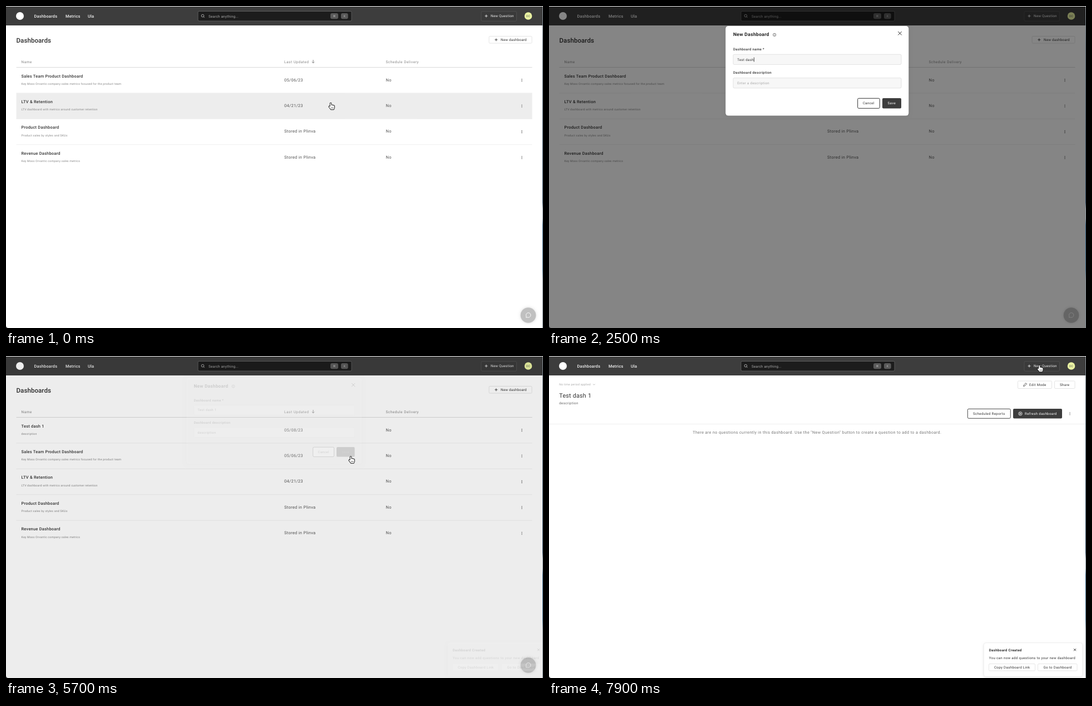
Animation, 965 px wide and 580 px high, one loop 8 s. Source, as an HTML page with a canvas:

```html
<!DOCTYPE html>
<html lang="en">
<head>
<meta charset="utf-8">
<title>Dashboards</title>
<style>
html, body { margin: 0; width: 100%; height: 100%; overflow: hidden; background: #fff; }
canvas { display: block; width: 965px; height: 580px; }
</style>
</head>
<body>
<canvas id="stage"></canvas>
<script>
const W = 965, H = 580, LOOP = 8000, TICK = 100;
const FONT = 'Roboto, "DejaVu Sans", sans-serif';
const canvas = document.getElementById('stage');
const ratio = window.devicePixelRatio || 1;
canvas.width = W * ratio;
canvas.height = H * ratio;
const ctx = canvas.getContext('2d');

// Text styles: weight, size, letter spacing, colour
const STYLE = {
  nav: [500, 7.4, 0.2, '#f4f4f4'],
  heading: [500, 11.5, 0.08, '#2c2c2c'],
  title: [400, 10.8, 0.2, '#333'],
  column: [400, 6.5, 0.5, '#858585'],
  name: [500, 7.4, 0.25, '#333'],
  note: [400, 5.2, 0.2, '#858585'],
  cell: [400, 7.5, 0.3, '#555'],
  action: [400, 6.3, 0.22, '#333'],
  body: [400, 6.2, 0.33, '#333'],
  label: [500, 6.2, 0.3, '#333'],
  strong: [700, 6.2, 0.33, '#2c2c2c'],
  modalTitle: [700, 8.6, 0.3, '#222'],
  empty: [400, 7.2, 0.38, '#777']
};

const DASHBOARDS = [
  ['Test dash 1', 'description', '05/08/23'],
  ['Sales Team Product Dashboard', 'Key Moss Orvantic company sales metrics focused for the product team', '05/06/23'],
  ['LTV & Retention', 'LTV dashboard with metrics around customer retention', '04/21/23'],
  ['Product Dashboard', 'Product sales by styles and SKUs', 'Stored in Plinva'],
  ['Revenue Dashboard', 'Key Moss Orvantic company sales metrics', 'Stored in Plinva']
];
const ROW_TOP = 110.5, ROW_H = 46.4;

// Pointer stops: time, x, y
const POINTER = [
  [0, 583.5, 174.5], [700, 906.5, 65], [1000, 906.5, 65], [1600, 496, 98],
  [4300, 497, 98], [4600, 626, 193], [4800, 619.5, 181], [5700, 619.5, 181],
  [5800, 619.5, 180], [6500, 915, 560], [6600, 915, 560], [7200, 830, 124],
  [7300, 830, 124], [7700, 881, 16.5], [LOOP, 881, 16.5]
];

const BUTTON = {
  create: [868, 54.5, 77, 12.5],
  save: [599, 166, 34, 18.5],
  goTo: [878.5, 554.5, 70.5, 12.5],
  refresh: [834, 95, 88, 17.5]
};

const CURSOR = {
  arrow: new Path2D('M0 0V9L2 7.1L3.5 10.3L5.1 9.6L3.7 6.5H6.5Z'),
  hand: new Path2D('M-.9 .8Q0 -.6 .9 .8V4.3Q2.2 3.2 2.9 4.6Q4.2 3.6 4.8 5Q6.5 4.3 6.5 6V8.4Q6.4 10 5.3 11.8H.3Q-.9 9.8 -3 7.5Q-3.4 5.8 -1.9 6L-.9 7Z')
};

const mix = (a, b, p) => a + (b - a) * p;
const smooth = p => p * p * (3 - 2 * p);
const inside = (p, [x, y, w, h]) => p.x >= x && p.x <= x + w && p.y >= y && p.y <= y + h;

function text(str, x, middle, style, color, align = 'left') {
  const [weight, size, spacing, ink] = STYLE[style];
  ctx.font = `${weight} ${size}px ${FONT}`;
  ctx.letterSpacing = spacing + 'px';
  ctx.textRendering = 'geometricPrecision';
  ctx.textAlign = align;
  ctx.fillStyle = color || ink;
  ctx.fillText(str, x, middle + size * 0.355);
  return ctx.measureText(str).width;
}

function box([x, y, w, h], radius, fill, stroke, width = 0.8) {
  ctx.beginPath();
  ctx.roundRect(x, y, w, h, radius);
  if (fill) { ctx.fillStyle = fill; ctx.fill(); }
  if (stroke) { ctx.strokeStyle = stroke; ctx.lineWidth = width; ctx.stroke(); }
}

function shadowBox(rect, radius, blur, stroke) {
  ctx.save();
  ctx.shadowColor = 'rgba(0,0,0,.1)';
  ctx.shadowBlur = blur * ratio;
  ctx.shadowOffsetY = ratio;
  box(rect, radius, '#fff');
  ctx.restore();
  if (stroke) box(rect, radius, null, stroke);
}

function lines(color, width, ...paths) {
  ctx.beginPath();
  for (const path of paths) {
    path.forEach(([x, y], i) => i ? ctx.lineTo(x, y) : ctx.moveTo(x, y));
  }
  ctx.strokeStyle = color;
  ctx.lineWidth = width;
  ctx.stroke();
}

function circle(x, y, r, fill, stroke, width = 0.8) {
  box([x - r, y - r, 2 * r, 2 * r], r, fill, stroke, width);
}

const plus = (x, y, color) =>
  lines(color, 0.9, [[x - 2.5, y], [x + 2.5, y]], [[x, y - 2.5], [x, y + 2.5]]);
const cross = (x, y, r, width) =>
  lines('#222', width, [[x - r, y - r], [x + r, y + r]], [[x + r, y - r], [x - r, y + r]]);
const kebab = (x, y) => [-2, 0, 2].forEach(d => circle(x, y + d, 0.65, '#444'));

function drawHeader() {
  ctx.fillStyle = '#3d3d3d';
  ctx.fillRect(0, 1, 964, 34);
  circle(25, 18, 7, '#fff');
  text('Dashboards', 50.5, 18, 'nav');
  text('Metrics', 107, 18, 'nav');
  text('Ula', 147, 18, 'nav');
  box([345, 9.5, 276, 17.5], 2, '#1c1c1c', '#666');
  circle(353.4, 17.6, 2.3, null, '#ccc');
  lines('#ccc', 0.8, [[355, 19.3], [356.7, 21]]);
  text('Search anything...', 364, 18.7, 'action', '#aaa');
  box([583, 13, 14, 10.3], 3, '#5a5a5a');
  box([602, 13, 12.7, 10.3], 3, '#5a5a5a');
  text('⌘', 590, 18.2, 'note', '#bbb', 'center');
  text('K', 608.5, 18.2, 'note', '#bbb', 'center');
  box([854, 9.8, 63.5, 17.4], 2, '#3a3a3a', '#555');
  plus(863, 18, '#eee');
  text('New Question', 871, 18.2, 'action', '#eee');
  circle(938.5, 18, 6.8, '#eaf3a2');
  text('DC', 938.6, 18.1, 'note', '#555', 'center');
}

function drawList(t, hoverRow) {
  text('Dashboards', 18.5, 62.3, 'heading');
  box(BUTTON.create, 1.5, '#fff', '#dedede');
  plus(880.8, 60.8, '#333');
  text('New dashboard', 889, 60.8, 'action');
  text('Name', 27.5, 100.2, 'column');
  text('Last Updated', 500, 100.2, 'column');
  lines('#666', 0.8, [[552, 97], [552, 102.7]], [[549.8, 100.5], [552, 102.8], [554.2, 100.5]]);
  text('Schedule Delivery', 682.5, 100.2, 'column');
  lines('#dadada', 1, [[18.5, ROW_TOP], [945.5, ROW_TOP]]);
  listRows(t).forEach(([name, note, updated], i, rows) => {
    const y = ROW_TOP + i * ROW_H;
    if (i === hoverRow) {
      ctx.fillStyle = '#ededed';
      ctx.fillRect(18.5, y, 927, ROW_H);
    }
    text(name, 27.5, y + 15.5, 'name');
    text(note, 27.5, y + 29.6, 'note');
    text(updated, 500, y + 22.5, 'cell');
    text('No', 682.5, y + 22.5, 'cell');
    kebab(927, y + 23.2);
    if (i < rows.length - 1) {
      lines('#ededed', 0.8, [[18.5, y + ROW_H], [945.5, y + ROW_H]]);
    }
  });
}

function drawDetail(pointer) {
  text('No time period applied', 18.3, 51, 'note', '#aaa');
  lines('#aaa', 0.8, [[79.3, 50.5], [81, 52.2], [82.7, 50.5]]);
  text('Test dash 1', 18.3, 70.8, 'title');
  text('description', 18.3, 85, 'body', '#666');
  box([842.5, 45, 61, 13.5], 1.5, '#fff', '#dedede');
  lines('#333', 0.8, [[852.7, 54.5], [853.2, 52.4], [857, 48.6], [858.6, 50.2], [854.8, 54], [852.7, 54.5]]);
  text('Edit Mode', 863, 51.8, 'body');
  box([908.5, 45, 36.5, 13.5], 1.5, '#fff', '#dedede');
  text('Share', 918, 51.8, 'body');
  box([752.3, 95.3, 77, 17], 2, '#fff', '#333', 0.9);
  text('Scheduled Reports', 762, 103.8, 'body');
  box(BUTTON.refresh, 2, inside(pointer, BUTTON.refresh) ? '#1e1e1e' : '#3d3d3d');
  circle(847, 103.8, 3.2, null, '#fff');
  lines('#fff', 0.8, [[846.1, 102.3], [848.6, 103.8], [846.1, 105.3], [846.1, 102.3]]);
  text('Refresh dashboard', 855, 103.8, 'body', '#fff');
  kebab(936, 103.8);
  lines('#ebebeb', 0.8, [[0, 122.5], [964, 122.5]]);
  text('There are no questions currently in this dashboard. Use the "New Question" button to create a question to add to a dashboard.',
    481.7, 137.3, 'empty', null, 'center');
}

function drawChat() {
  ctx.save();
  ctx.shadowColor = 'rgba(0,0,0,.15)';
  ctx.shadowBlur = 5 * ratio;
  circle(938.5, 557, 13.8, '#c0c0c0');
  ctx.restore();
  ctx.beginPath();
  ctx.arc(938.7, 556.8, 4.2, Math.PI * 0.85, Math.PI * 2.6);
  ctx.lineTo(934.6, 561);
  ctx.closePath();
  ctx.strokeStyle = '#fff';
  ctx.lineWidth = 0.9;
  ctx.stroke();
}

function drawToast(t) {
  if (t < 5700) return;
  const shift = t < 5800 ? 12 : t < 6100 ? 1 : 0;
  ctx.save();
  ctx.globalAlpha = t < 5800 ? 0.13 : 1;
  ctx.translate(shift, 0);
  shadowBox([781.3, 516.7, 177.4, 60.8], 4, 4, '#ededed');
  text('Dashboard Created', 790.7, 529.3, 'strong');
  cross(945, 529.2, 2, 0.9);
  text('You can now add questions to your new dashboard', 790.7, 544.2, 'body');
  box([790.5, 554.5, 83, 12.5], 1.5, '#fff', '#e0e0e0');
  text('Copy Dashboard Link', 800, 560.7, 'body');
  box(BUTTON.goTo, 1.5, '#fff', '#e0e0e0');
  text('Go to Dashboard', 888.5, 560.7, 'body');
  ctx.restore();
}

function drawField(y, value, placeholder, focused) {
  box([331, y, 302, 18.2], 2, '#f7f7f7', '#dcdcdc');
  const middle = y + 9.3;
  const width = value ? text(value, 338.2, middle, 'body') : 0;
  if (!value) text(placeholder, 338.2, middle, 'body', '#a8a8a8');
  if (focused) lines('#222', 0.8, [[338.6 + width, middle - 4], [338.6 + width, middle + 4]]);
}

function typedName(t) {
  if (t < 1800) return '';
  const count = t >= 2900 ? 11 : t >= 2800 ? 10 : 1 + Math.round(Math.min(1, (t - 1800) / 700) * 8);
  return 'Test dash 1'.slice(0, count);
}

function typedNote(t) {
  if (t < 3400) return '';
  return 'description'.slice(0, 1 + Math.round(Math.min(1, (t - 3400) / 800) * 10));
}

function modalAmount(t) {
  if (t < 1000 || t >= 5800) return 0;
  return t < 1100 ? 0.5 : t < 5700 ? 1 : 0.15;
}

function drawModal(t, pointer) {
  const amount = modalAmount(t);
  if (!amount) return;
  ctx.fillStyle = `rgba(0,0,0,${0.48 * amount})`;
  ctx.fillRect(0, 1, 964, 579);
  ctx.save();
  ctx.globalAlpha = amount;
  const scale = 0.95 + 0.05 * amount;
  ctx.translate(481.8, 116.7);
  ctx.scale(scale, scale);
  ctx.translate(-481.8, -116.7);
  shadowBox([317.3, 36, 329, 161.6], 5, 6);
  text('New Dashboard', 331, 51.2, 'modalTitle');
  circle(405.2, 51.9, 2.6, null, '#444', 0.7);
  lines('#444', 0.7, [[405.2, 51.6], [405.2, 53.4]], [[405.2, 50.3], [405.2, 50.9]]);
  cross(630.5, 49.2, 3.2, 1);
  text('Dashboard name *', 331, 78, 'label');
  drawField(87.2, typedName(t), 'Enter a name', t >= 1600 && t < 3200);
  text('Dashboard description', 331, 120, 'label');
  drawField(129.6, typedNote(t), 'Enter a description', t >= 3200 && t < 4600);
  box([554.7, 166.3, 39.6, 18], 2, '#fff', '#333', 1);
  text('Cancel', 564, 175.2, 'body');
  box(BUTTON.save, 2, inside(pointer, BUTTON.save) ? '#1e1e1e' : '#3d3d3d');
  text('Save', 608.6, 175.2, 'body', '#fff');
  ctx.restore();
}

function pointerAt(t) {
  const i = POINTER.findIndex(stop => stop[0] > t);
  const [t0, x0, y0] = POINTER[i - 1], [t1, x1, y1] = POINTER[i];
  const p = smooth((t - t0) / (t1 - t0));
  return { x: mix(x0, x1, p), y: mix(y0, y1, p) };
}

const listRows = t => DASHBOARDS.slice(t < 5700 ? 1 : 0);

function rowUnder(t, p) {
  if (modalAmount(t) || t >= 6700 || p.x < 18.5 || p.x > 945.5) return -1;
  const row = Math.floor((p.y - ROW_TOP) / ROW_H);
  return row < listRows(t).length ? row : -1;
}

function pointerKind(t, p, row) {
  if (t >= 1800 && t < 4400) return 'none';
  if (t >= 7900 || row >= 0) return 'hand';
  if (modalAmount(t)) {
    if (inside(p, BUTTON.save)) return 'hand';
    const onField = inside(p, [331, 87, 302, 18.5]) || inside(p, [331, 129.5, 302, 18.5]);
    return onField ? 'beam' : 'arrow';
  }
  const targets = t < 6700 ? [BUTTON.create, BUTTON.goTo] : [BUTTON.refresh];
  return targets.some(b => inside(p, b)) ? 'hand' : 'arrow';
}

function drawPointer(kind, { x, y }) {
  if (kind === 'none') return;
  ctx.save();
  ctx.translate(x, y);
  ctx.lineJoin = 'round';
  if (kind === 'beam') {
    const beam = [[[-2, -6], [0, -5], [2, -6]], [[0, -5], [0, 5]], [[-2, 6], [0, 5], [2, 6]]];
    lines('#fff', 1.8, ...beam);
    lines('#222', 0.9, ...beam);
  } else {
    const hand = kind === 'hand';
    ctx.strokeStyle = hand ? '#111' : '#fff';
    ctx.fillStyle = hand ? '#fff' : '#111';
    ctx.lineWidth = hand ? 1.8 : 1.3;
    ctx.stroke(CURSOR[kind]);
    ctx.fill(CURSOR[kind]);
    if (hand) lines('#111', 0.6, [[1.1, 8], [1.1, 10]], [[2.8, 8], [2.8, 10]], [[4.5, 8], [4.5, 10]]);
  }
  ctx.restore();
}

function drawWindowEdge() {
  ctx.fillStyle = '#f2f2f2';
  ctx.fillRect(0, 0, W, 1);
  const edge = ctx.createLinearGradient(0, 0, 0, H);
  [[0, '#8e9498'], [0.12, '#566673'], [0.4, '#2d4558'], [0.61, '#1f3b54'], [0.63, '#8c979f'],
    [0.66, '#8c979f'], [0.68, '#2a587c'], [0.82, '#34607e'], [0.85, '#7d8890'], [1, '#7d8890']]
    .forEach(([at, color]) => edge.addColorStop(at, color));
  ctx.fillStyle = edge;
  ctx.fillRect(964, 1, 1, 579);
  ctx.fillStyle = '#222';
  ctx.fill(new Path2D('M0 576Q.3 579.7 4 580H0Z'));
}

function render(t) {
  ctx.setTransform(ratio, 0, 0, ratio, 0, 0);
  ctx.fillStyle = '#fff';
  ctx.fillRect(0, 0, W, H);
  const pointer = pointerAt(t);
  const row = rowUnder(t, pointer);
  drawHeader();
  if (t < 6700) drawList(t, row);
  else drawDetail(pointer);
  drawChat();
  drawModal(t, pointer);
  drawToast(t);
  drawWindowEdge();
  drawPointer(pointerKind(t, pointer, row), pointer);
}

const start = performance.now();
function loop() {
  const elapsed = (performance.now() - start) % LOOP;
  render(Math.floor(elapsed / TICK) * TICK);
  requestAnimationFrame(loop);
}
loop();
</script>
</body>
</html>
```
